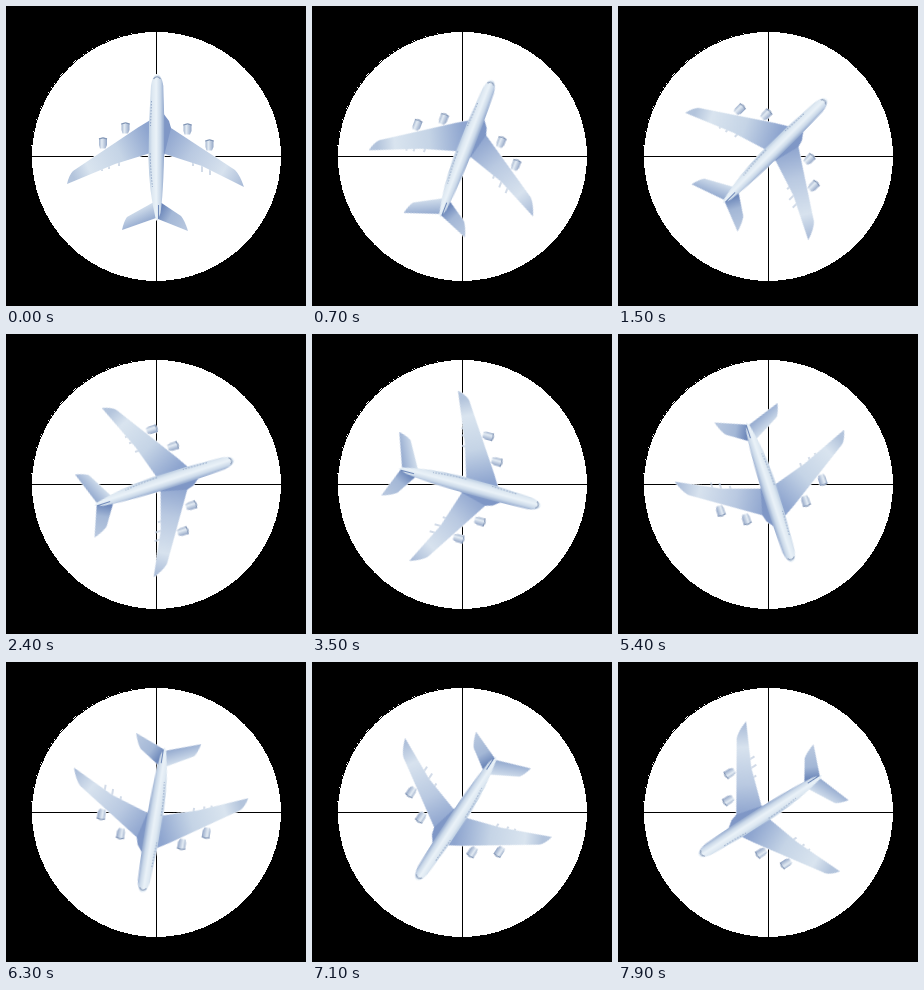
Animation, 300 px wide and 300 px high, one loop 8 s. Source, as an HTML page:

```html
<!DOCTYPE html>
<html lang="en">
<head>
<meta charset="utf-8">
<title>Plane in a scope</title>
<style>
  html, body { margin: 0; width: 100%; height: 100%; overflow: hidden; background: #000; }
  svg { display: block; width: 100vw; height: 100vh; }
  #plane { transform-origin: 150px 150px; }
</style>
</head>
<body>
<svg viewBox="0 0 300 300">
  <defs>
    <linearGradient id="body" x1="142" x2="158.500" y1="0" y2="0" gradientUnits="userSpaceOnUse">
      <stop offset="0" stop-color="#b4c7de"/>
      <stop offset=".25" stop-color="#dce7f1"/>
      <stop offset=".5" stop-color="#eaf2f8"/>
      <stop offset=".75" stop-color="#cbd9e9"/>
      <stop offset="1" stop-color="#8ca3ca"/>
    </linearGradient>
    <linearGradient id="left" x1="68" y1="172" x2="146" y2="134" gradientUnits="userSpaceOnUse">
      <stop offset="0" stop-color="#b3c4dc"/>
      <stop offset=".2" stop-color="#d9e4ef"/>
      <stop offset=".6" stop-color="#c5d4e6"/>
      <stop offset="1" stop-color="#8ea5cf"/>
    </linearGradient>
    <linearGradient id="right" x1="158" y1="128" x2="238" y2="176" gradientUnits="userSpaceOnUse">
      <stop offset="0" stop-color="#8ba2cd"/>
      <stop offset=".35" stop-color="#b9c9e1"/>
      <stop offset=".75" stop-color="#d7e2ee"/>
      <stop offset="1" stop-color="#aabcd8"/>
    </linearGradient>
    <linearGradient id="tailLeft" x1="130" y1="205" x2="137" y2="220" gradientUnits="userSpaceOnUse">
      <stop offset="0" stop-color="#cfdceb"/>
      <stop offset="1" stop-color="#8ca3cb"/>
    </linearGradient>
    <linearGradient id="tailRight" x1="153" y1="206" x2="180" y2="220" gradientUnits="userSpaceOnUse">
      <stop offset="0" stop-color="#6b86b9"/>
      <stop offset=".4" stop-color="#a3b7d6"/>
      <stop offset="1" stop-color="#b6c6de"/>
    </linearGradient>
    <linearGradient id="pod">
      <stop offset="0" stop-color="#a3b4ce"/>
      <stop offset=".35" stop-color="#e4ecf4"/>
      <stop offset="1" stop-color="#93a6c6"/>
    </linearGradient>
    <g id="engine">
      <path d="M-4-4Q0-6.500 4-4L4 2 2.500 5.500H-3L-4 2Z" fill="url(#pod)"/>
      <path d="M-4-4Q0-6 4-4" fill="none" stroke="#8094b4"/>
    </g>
    <g id="shape">
      <g stroke="#c3cfe0" stroke-width="1">
        <path d="M96 160V165M103 158V163M113 155V160M187 155V160M196 160V166M204 163V169"/>
      </g>
      <use href="#engine" x="97" y="137"/>
      <use href="#engine" x="119.500" y="122"/>
      <use href="#engine" x="181.500" y="123"/>
      <use href="#engine" x="203.500" y="139"/>
      <path d="M146 113L132 121.500 67 165Q63 169 61 178L109 158 146 146.500Z" fill="url(#left)"/>
      <path d="M157 109L165 122 229 164Q234 169 238 181L196 160 156 147Z" fill="url(#right)"/>
      <path d="M157 107L163 115 165 122 158 150Z" fill="#7f97c6"/>
      <path d="M148 196L121 211Q118 215 116 224L150 212Z" fill="url(#tailLeft)"/>
      <path d="M154 196L175 210Q179 215 182 225L152 213Z" fill="url(#tailRight)"/>
      <path d="M151 68.500C154 68.500 156.500 73 157.300 80Q159 115 158 152 157 190 154.500 207L151.500 215 149.500 212Q143 185 142.500 152 142.500 115 145 80C146 73 148 68.500 151 68.500Z" fill="url(#body)"/>
    </g>
  </defs>

  <rect width="300" height="300" fill="#000"/>
  <g shape-rendering="crispEdges">
    <circle cx="150" cy="150" r="125" fill="#fff"/>
    <circle cx="150.500" cy="150.500" r="125" fill="none" stroke="#000"/>
    <path d="M150 25h1v250h-1zM25 150h250v1H25z"/>
  </g>

  <g id="plane">
    <use href="#shape" stroke="#fff" stroke-width="1.200" stroke-linejoin="round"/>
    <use href="#shape"/>
    <path d="M147.500 73Q151 68.500 154.500 73" fill="none" stroke="#8598b6" stroke-width="1.200"/>
    <path d="M145.500 95L144.500 120M144.200 147Q144.500 165 146.500 181" fill="none" stroke="#93a8c8" stroke-width="1" stroke-dasharray="1.500 1.500"/>
    <path d="M152.500 199V213" stroke="#6e88b8" stroke-width="1"/>
  </g>
</svg>
<script>
  // 80 poses, 3 degrees apart
  const poses = 80, stepMs = 100, stepDeg = 3;
  document.getElementById('plane').animate(
    [{ transform: 'rotate(0deg)' }, { transform: `rotate(${poses * stepDeg}deg)` }],
    { duration: poses * stepMs, iterations: Infinity, easing: `steps(${poses}, end)` }
  );
</script>
</body>
</html>
```
